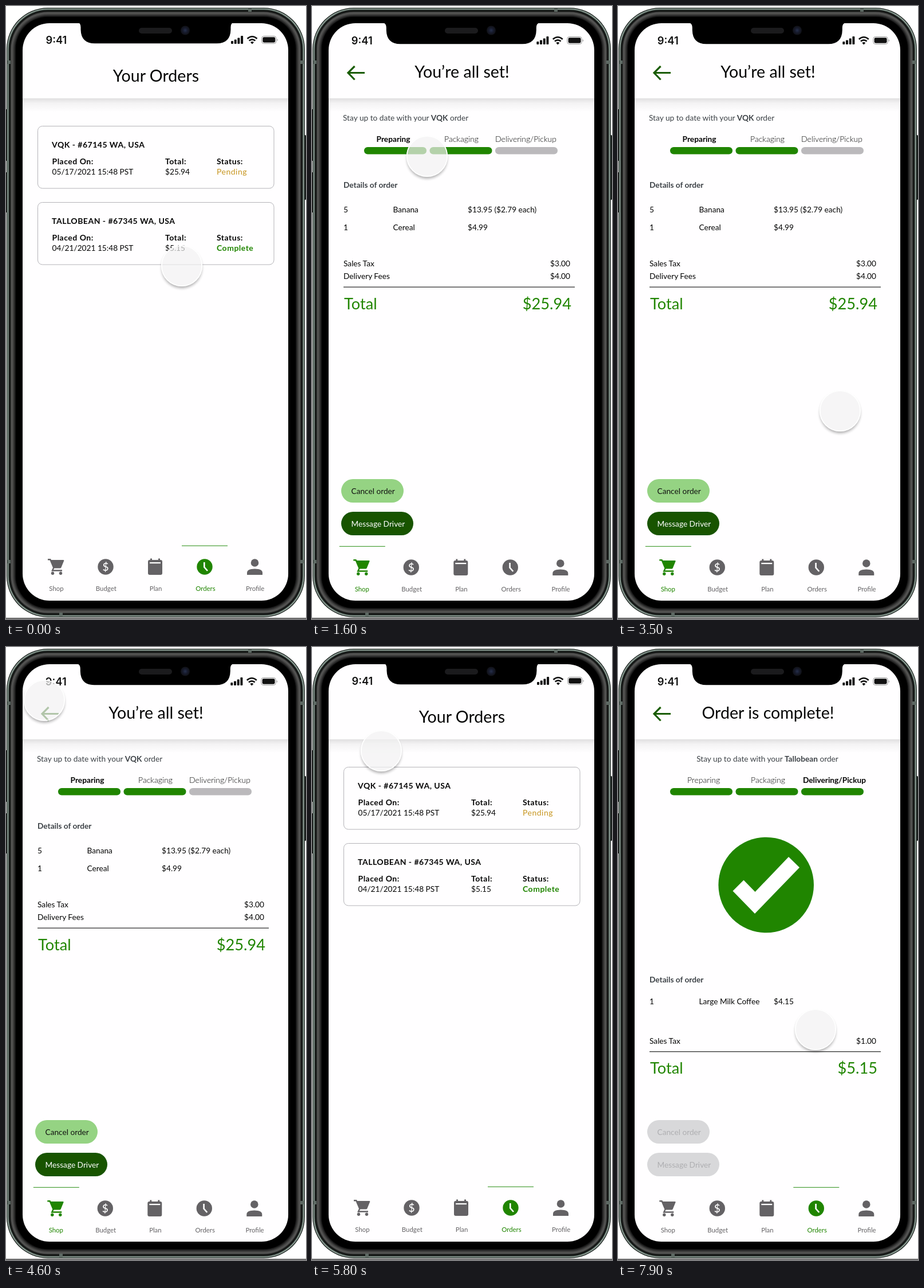
Write an HTML page that moves like this. It is 524 px wide and 1069 px high and loops after 8000 ms.

```html
<!DOCTYPE html>
<html lang="en">
<head>
<meta charset="utf-8">
<title>Your Orders</title>
<style>
html, body { margin: 0; width: 100%; height: 100%; overflow: hidden; background: #fff; }
svg { display: block; width: 100vw; height: 100vh; }
text { font: 400 13.7px Lato, "Open Sans", sans-serif; fill: #050505; white-space: pre; }
.title { font-size: 28.6px; }
.sum { font-size: 27.2px; fill: #208500; }
.b, .h { font-weight: 700; }
.h, .state { font-size: 14px; letter-spacing: .5px; }
.light { font-weight: 300; font-size: 14px; }
.note { fill: #3d4247; }
.tab { font-size: 11.4px; text-anchor: middle; fill: #646265; }
.mid { text-anchor: middle; }
.end { text-anchor: end; }
.clock { font: 600 18.3px Inter, sans-serif; fill: #111; }
</style>
</head>
<body>
<svg id="stage" viewBox="0 0 524 1069" preserveAspectRatio="none"></svg>
<script>
const GREEN = '#208500', GREY = '#646265';
const stage = document.getElementById('stage');

const text = (x, y, s, cls = '', fill = '') =>
  `<text x="${x}" y="${y}" class="${cls}"${fill && ` style="fill:${fill}"`}>${s}</text>`;
const rect = (x, y, w, h, r, fill, more = '') =>
  `<rect x="${x}" y="${y}" width="${w}" height="${h}" rx="${r}" fill="${fill}" ${more}/>`;
const path = (d, more) => `<path d="${d}" ${more}/>`;
const stroke = (color, w) => `fill="none" stroke="${color}" stroke-width="${w}"`;
const shift = (x, y, s) => `<g transform="translate(${x} ${y})">${s}</g>`;

const defs = `<defs>
  <linearGradient id="shade" x2="0" y2="1">
    <stop stop-color="#000" stop-opacity=".12"/>
    <stop offset=".35" stop-color="#000" stop-opacity=".045"/>
    <stop offset="1" stop-color="#000" stop-opacity="0"/>
  </linearGradient>
  <radialGradient id="lens"><stop stop-color="#26304c"/><stop offset=".5" stop-color="#171b2c"/>
    <stop offset="1" stop-color="#101116"/></radialGradient>
  <filter id="soft" x="-50%" y="-50%" width="200%" height="200%"><feGaussianBlur stdDeviation="2.6"/></filter>
  <clipPath id="screen"><rect x="29" y="30" width="464" height="1007" rx="47"/></clipPath>
</defs>`;

// Nested rounded outlines: [inset, colour] from the rim to the bezel
function phone() {
  const rings = [
    [0, '#1b211e'], [1.3, '#8fa198'], [3.3, '#2c3430'], [4.8, '#0c0e0d'], [6.5, '#333433'],
    [8, '#545453'], [10.5, '#444443'], [12.5, '#2c2c2c'], [14.5, '#141414'], [16, '#000']
  ];
  return rect(0, 180, 2, 90, 0, '#222') + rect(0, 290, 2, 70, 0, '#222') +
    rect(520, 225, 4, 113, 1.5, '#1b211e') +
    rings.map(([d, c]) => rect(1 + d, 3 + d, 521 - 2 * d, 1063 - 2 * d, 72 - d, c)).join('') +
    [[423, 4, 6, 6], [93, 1058, 6, 6], [2, 95, 6, 6], [514, 95, 6, 6], [2, 966, 6, 6], [514, 966, 6, 6]]
      .map(([x, y, w, h]) => rect(x, y, w, h, 0, '#5d6963')).join('') +
    rect(0, 1067, 524, 1.5, 0, '#333') +
    rect(29, 30, 464, 1007, 47, '#fffeff');
}

const notch = path('M124 28Q130.5 29 130.5 37V41Q131 65.3 155 65.3H368Q392 65.3 392.5 41V37Q392.5 29 399 28Z');

const lens = rect(232, 38, 58, 10, 5, '#1b1b1d') + '<circle cx="313" cy="42.5" r="8" fill="url(#lens)"/>';

function status() {
  const bars = [5, 7.5, 10.5, 14].map((h, i) => rect(393 + i * 5.7, 66 - h, 4, h, 1, '#111')).join('');
  const wifi = path('M421.5 57Q430 49.5 438.5 57M424.6 60.6Q430 56 435.4 60.6', stroke('#111', 2.6)) +
    path('M427 63.2Q430 60.6 433 63.2L430 66.4Z', 'fill="#111"');
  return notch + text(69.5, 65.5, '9:41', 'clock') + bars + wifi +
    rect(446.5, 52.5, 25.5, 13, 4, 'none', 'stroke="#999" stroke-width="1"') +
    rect(448.3, 54.3, 22, 9.4, 2.4, '#111') + path('M473.6 57Q476 59 473.6 61.5Z', 'fill="#999"');
}

const cart = color =>
  path('M77 966H100Q102 966 101 968L96.5 979Q96 980.5 94 980.5H83Z', `fill="${color}"`) +
  path('M73 965.2H77.3L83.3 979.5L81 984.5H98', stroke(color, 2.4)) +
  [81.5, 95.5].map(x => `<circle cx="${x}" cy="989.3" r="2.7" fill="${color}"/>`).join('');

function tabs(active) {
  const color = i => i === active ? GREEN : GREY;
  const disc = (x, i) => `<circle cx="${x}" cy="978" r="13.7" fill="${color(i)}"/>`;
  const icons = cart(color(0)) +
    disc(174, 1) + '<text x="174" y="985" class="mid" style="font:500 19px Lato,sans-serif;fill:#fff">$</text>' +
    rect(248, 966, 25, 26, 3, GREY) + rect(252, 963.5, 3, 5, 0, GREY) + rect(266, 963.5, 3, 5, 0, GREY) +
    rect(251, 970, 19, 2.2, 0, '#fff') +
    disc(347, 3) + path('M346.3 970V978.5L352 985', stroke('#fff', 2.6)) +
    `<circle cx="434.5" cy="971" r="6.8" fill="${GREY}"/>` +
    path('M421 992V988.5Q421 981.5 434.5 981.5T448 988.5V992Z', `fill="${GREY}"`);
  const labels = ['Shop', 'Budget', 'Plan', 'Orders', 'Profile']
    .map((s, i) => text(88 + i * 86.8, 1019.6, s, 'tab', color(i))).join('');
  return rect([48.5, 0, 0, 307][active], 940.8, 80, 1.2, 0, '#4aa039') + icons + labels;
}

const header = (title, y) =>
  rect(29, 161, 464, 24, 0, 'url(#shade)') + text(262, y, title, 'title mid');

function card(y, name, date, total, state, color, cls) {
  return rect(55.5, y + .5, 412.5, 108.5, 8, '#fffeff', 'stroke="#b4b3b8" stroke-width="1"') +
    text(80, y + 38, name, 'h') + text(80.5, y + 67, 'Placed On:', 'h') + text(80.5, y + 85, date) +
    text(278, y + 67, 'Total:', 'h') + text(278, y + 85, total) +
    text(368, y + 67, 'Status:', 'h') + text(368, y + 85, state, cls, color);
}

const orders = header('Your Orders', 132) +
  card(209, 'VQK - #67145 WA, USA', '05/17/2021 15:48 PST', '$25.94', 'Pending', '#c7951f', 'state') +
  card(342, 'TALLOBEAN - #67345 WA, USA', '04/21/2021 15:48 PST', '$5.15', 'Complete', GREEN, 'h') +
  status() + tabs(3);

const button = (y, w, s, fill, ink) => rect(51, y, w, 41, 20.5, fill) + text(68.5, y + 26, s, '', ink);

// Shared layout of both order pages
function order(o) {
  const steps = ['Preparing', 'Packaging', 'Delivering/Pickup'].map((s, i) =>
    rect(91 + i * 114.5, 246, 109, 12.5, 6.2, i < o.done ? GREEN : '#bbb9bc') +
    text(o.stepX[i], 237, s, 'mid ' + (i === o.bold ? 'b' : 'light'))).join('');
  const items = o.items.map(([y, n, name, cost]) =>
    text(55, y, n) + text(141.5, y, name) + text(272, y, cost)).join('');
  const fees = o.fees.map(([y, name, cost]) => text(55, y, name) + text(451, y, cost, 'end')).join('');
  return header(o.title, 125) +
    path('M92 116.5H63M74.5 105L63 116.5L74.5 128.5', stroke('#1a5c00', 3.2)) +
    text(o.noteX, 199.6, `Stay up to date with your <tspan class="b">${o.shop}</tspan> order`, 'note ' + o.noteCls) +
    steps + text(55, o.detailY, 'Details of order', 'b note') + items + fees +
    rect(55, o.lineY, 404, 1.3, 0, '#333') +
    text(56, o.lineY + 39, 'Total', 'sum') + text(453, o.lineY + 39, o.total, 'sum end') +
    button(825, 109, 'Cancel order', ...o.cancel) + button(882, 126, 'Message Driver', ...o.message) +
    shift(-.7, 1, status() + tabs(o.tab));
}

const pending = order({
  title: 'You’re all set!', shop: 'VQK', noteX: 54, noteCls: '', done: 2, bold: 0,
  stepX: [142, 261, 373.5], detailY: 316.5,
  items: [[360, 5, 'Banana', '$13.95 ($2.79 each)'], [390.5, 1, 'Cereal', '$4.99']],
  fees: [[453.5, 'Sales Tax', '$3.00'], [476, 'Delivery Fees', '$4.00']],
  lineY: 489.5, total: '$25.94', cancel: ['#95d383', '#111'], message: ['#185400', '#fff'], tab: 0
});

const complete = order({
  title: 'Order is complete!', shop: 'Tallobean', noteX: 261, noteCls: 'mid', done: 3, bold: 2,
  stepX: [149.5, 262, 378], detailY: 585,
  items: [[622.5, 1, 'Large Milk Coffee', '$4.15']],
  fees: [[691.5, 'Sales Tax', '$1.00']],
  lineY: 705, total: '$5.15', cancel: ['#d8d8da', '#aeaeb1'], message: ['#d8d8da', '#aeaeb1'], tab: 3
}) + `<circle cx="258.7" cy="415" r="83.3" fill="${GREEN}"/>` +
  path('M200.5 425.5L219.5 406.5L239.5 427L298 366L317 384.5L239 465Z', 'fill="#fff"');

stage.innerHTML = defs + phone() +
  `<g clip-path="url(#screen)">${[orders, pending, complete].map(p => `<g class="page">${p}</g>`).join('')}</g>` +
  lens +
  `<g id="touch">
    <mask id="ring"><rect x="-60" y="-60" width="120" height="120" fill="#fff"/><circle r="35.5" fill="#000"/></mask>
    <g id="rim"><g mask="url(#ring)"><circle cy="4" r="35" fill="#000" opacity=".32" filter="url(#soft)"/></g></g>
    <circle id="disc" r="36"/>
    <circle id="edge" r="35.2" fill="none" stroke="#fff" stroke-width="1.8"/>
  </g>`;

const [touch, rim, disc, edge] = ['touch', 'rim', 'disc', 'edge'].map(id => document.getElementById(id));
const pages = document.querySelectorAll('.page');

const route = [
  [0, 307, 453], [800, 208, 268], [1000, 201, 262], [1700, 201, 262], [2300, 223, 547],
  [2650, 281, 560], [2750, 281, 560], [3350, 394, 718], [3450, 394, 718], [4050, 97, 130],
  [4150, 97, 130], [4600, 67, 93], [4950, 76, 113], [5400, 76, 113], [5800, 121, 181],
  [6850, 394, 412], [7300, 394, 412], [7900, 345, 667], [8000, 345, 667]
];
const taps = [1150, 5050, 7100];
const switches = [[0, 0], [1350, 1], [5250, 0], [7350, 2]];

function position(t) {
  const i = route.findIndex(k => k[0] > t);
  const [t0, x0, y0] = route[i - 1], [t1, x1, y1] = route[i];
  const u = (t - t0) / (t1 - t0), e = u * u * (3 - 2 * u);
  return [x0 + (x1 - x0) * e, y0 + (y1 - y0) * e];
}

function draw(t) {
  const page = switches.filter(s => s[0] <= t).pop()[1];
  pages.forEach((p, i) => p.style.display = i === page ? '' : 'none');
  const near = Math.min(...taps.map(k => Math.abs(t - k)));
  const press = Math.max(0, Math.min(1, (200 - near) / 100));
  const [x, y] = position(t);
  touch.setAttribute('transform', `translate(${x} ${y})`);
  rim.setAttribute('opacity', 1 - press);
  edge.setAttribute('opacity', 1 - press);
  const c = 242 + 13 * press;
  disc.setAttribute('fill', `rgba(${c},${c},${c},${.7 - .28 * press})`);
}

function loop() {
  draw(performance.now() % 8000);
  requestAnimationFrame(loop);
}
loop();
</script>
</body>
</html>
```
